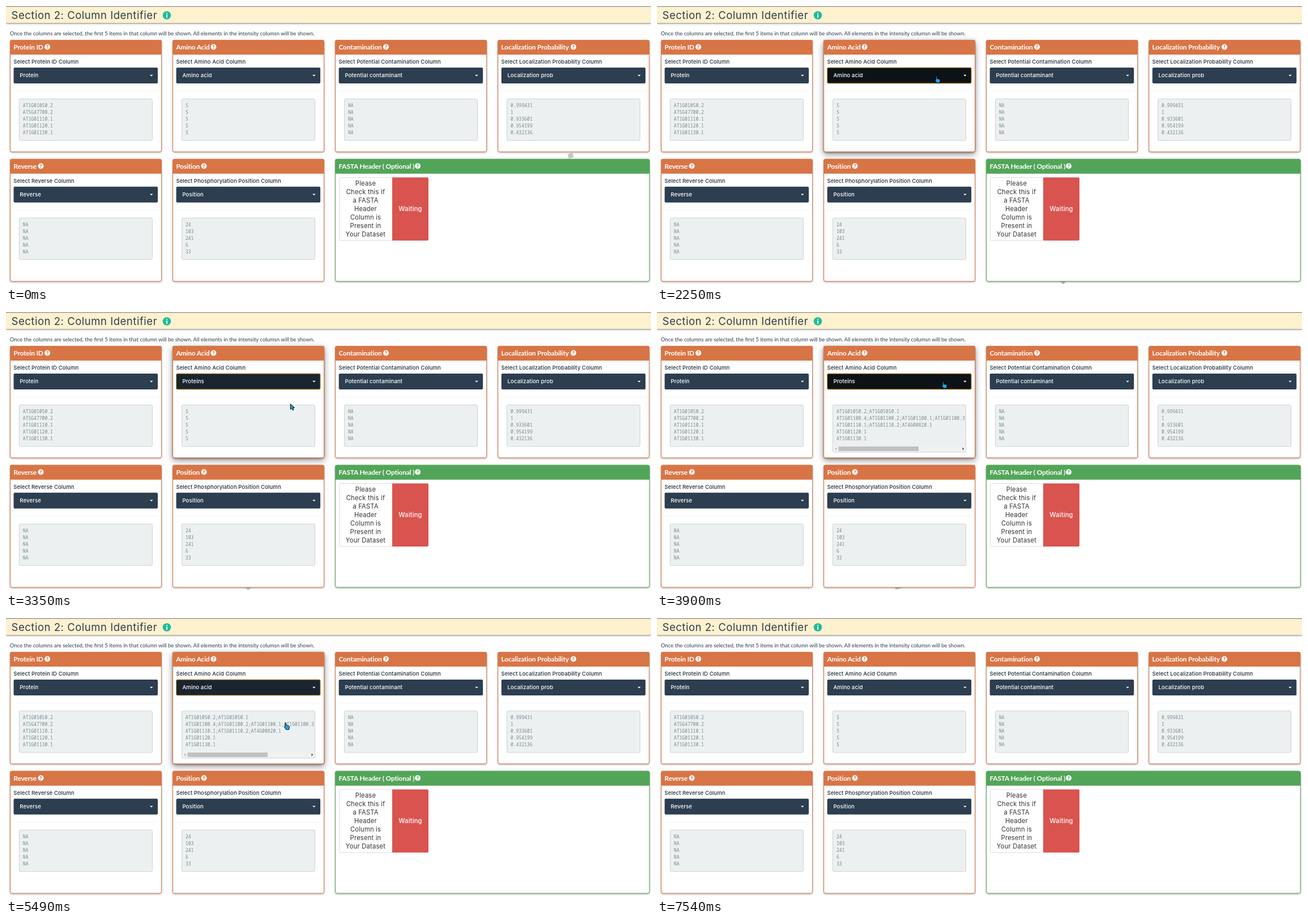
An HTML page that plays this animation: 1139 px wide and 492 px high, repeating every 7610 ms.

```html
<!DOCTYPE html>
<html lang="en">
<head>
<meta charset="utf-8">
<title>Column Identifier</title>
<style>
  html, body { margin: 0; width: 100%; height: 100%; overflow: hidden; background: #fefefe; }
  svg { display: block; }
  text { font: 500 9.6px Inter, sans-serif; letter-spacing: .1px; fill: #2c3e50; white-space: pre; }
  .title { font-size: 18.5px; font-weight: 400; letter-spacing: .53px; }
  .intro { font: 9.5px Lato, sans-serif; letter-spacing: 0; }
  .head { font: 700 12px Lato, sans-serif; letter-spacing: -.22px; fill: #fff; }
  .icon { font: 900 9px Lato, sans-serif; text-anchor: middle; }
  .label { font-size: 9.5px; fill: #1f2d3a; }
  .light { fill: #fff; }
  .mono { font: 8.05px "Noto Sans Mono", monospace; letter-spacing: 0; fill: #7b8a8b; }
  .toggle { font-size: 11.2px; font-weight: 400; letter-spacing: .2px; text-anchor: middle; fill: #333; }
  .item { fill: #8a9697; font-weight: 400; }
  .base { filter: drop-shadow(0 1px 1.5px rgba(0,0,0,.35)); }
  .lift { filter: drop-shadow(0 4px 6px rgba(0,0,0,.42)); opacity: 0; }
</style>
</head>
<body>
<svg id="stage" width="1139" height="492" viewBox="0 0 1139 492"></svg>
<script>
const LOOP = 7610, NAVY = '#2c3e50', ORANGE = '#d87546', GREEN = '#52a558';
const stage = document.getElementById('stage');
const $ = id => document.getElementById(id);

const rect = (x, y, w, h, fill, extra = '') =>
  `<rect x="${x}" y="${y}" width="${w}" height="${h}" fill="${fill}" ${extra}/>`;
const text = (x, y, cls, str, extra = '') => `<text x="${x}" y="${y}" class="${cls}" ${extra}>${str}</text>`;
const path = (d, fill, extra = '') => `<path d="${d}" fill="${fill}" ${extra}/>`;
const lines = (x, y, list) => list.map((s, i) => text(x, y + i * 12, 'mono', s)).join('');

function panel(id, x, y, w, h, color, title, iconX) {
  const box = cls => rect(x + .5, y + .5, w - 1, h - 1, '#fff', `rx="3" class="${cls}" stroke="${color}"`);
  return `<g id="${id}">` + box('base') + box('lift') +
    path(`M${x} ${y + 26}v-23q0-3 3-3h${w - 6}q3 0 3 3v23z`, color) +
    text(x + 6.3, y + 16.8, 'head', title) +
    `<circle cx="${iconX}" cy="${y + 12.5}" r="5" fill="#fff"/>` +
    text(iconX, y + 15.8, 'icon', '?', `style="fill:${color}"`);
}

function column(id, col, row, title, iconX, label, value, items) {
  const x = 7 + col * 287.1, y = 60 + row * 210.7;
  return panel(id, x, y, 268, row ? 217 : 198.5, ORANGE, title, iconX) +
    text(x + 6.3, y + 42.4, 'label', `Select ${label} Column`) +
    rect(x + 6.5, y + 49, 254.5, 28, NAVY, 'rx="2" class="button"') +
    text(x + 17.3, y + 66.4, 'light value', value) +
    path(`M${x + 247} ${y + 61.8}h5.6l-2.8 2.8z`, '#fff') +
    rect(x + 6.5, y + 90, 254.5, 1, '#f1f3f3') +
    rect(x + 16.3, y + 104.5, 235, 73.5, '#ecf0f1', 'rx="2" stroke="#ccd2d4" class="output"') +
    `<g class="items">${lines(x + 22.8, y + 119.4, items)}</g></g>`;
}

const na = Array(5).fill('NA');
const options = ['Amino acid', 'Proteins', 'Positions within proteins', 'Leading proteins', 'Protein',
  'Fasta headers', 'Localization prob', 'Score diff', 'PEP', 'Score'];
const proteins = ['AT1G01050.2;AT1G01050.1', 'AT1G01100.4;AT1G01100.2;AT1G01100.1;AT1G01100.3',
  'AT1G01110.1;AT1G01110.2;AT4G00820.1', 'AT1G01120.1', 'AT1G01130.1'];
const prompt = ['Please', 'Check this if', 'a FASTA', 'Header', 'Column is', 'Present in', 'Your Dataset'];

const menu = `<g id="menu">` +
  rect(301, 138, 253.5, 203.5, '#fff', 'rx="2" stroke="#ccc" stroke-width=".7" class="base"') +
  rect(306.8, 145, 242.6, 27.8, '#fff', `rx="3" stroke="${NAVY}" stroke-width="1.5"`) +
  rect(317, 153, 1, 11, '#333', 'id="caret"') +
  `<clipPath id="list"><path d="M301 175.5h253v164.5h-253z"/></clipPath><g clip-path="url(#list)">` +
  options.map((s, i) => {
    const y = 175.5 + i * 16.9;
    return `<g class="option">${rect(301, y, 244, 17, NAVY)}${text(314, y + 11.6, 'item', s)}</g>`;
  }).join('') + `</g>` +
  rect(545, 175.5, 9, 165, '#f1f1f1') + rect(545.7, 185, 7.4, 10, '#c1c1c1') +
  path('M547 182.3h5l-2.5-3z', '#a3a3a3') + path('M547 332.3h5l-2.5 3z', '#505050') + `</g>`;

const longOutput = `<g id="long">` +
  rect(310.4, 164.5, 235, 83.5, '#ecf0f1', 'rx="2" stroke="#ccd2d4"') +
  `<clipPath id="inner"><path d="M311 165h234v82h-234z"/></clipPath>` +
  `<g clip-path="url(#inner)">${lines(316.9, 179.4, proteins)}</g>` +
  rect(311, 237, 234, 10, '#f1f1f1') + rect(320.5, 238, 141.5, 8, '#c1c1c1') +
  path('M317 239.7v4.6l-2.4-2.3z', '#a3a3a3') + path('M539.5 239.5v5l2.8-2.5z', '#505050') + `</g>`;

stage.innerHTML =
  rect(0, 0, 1139, 492, '#fefefe') +
  rect(0, 1, 1139, 29.5, '#fef1cf', 'class="base"') + rect(0, 0, 1139, 1.5, '#a0a09c') +
  rect(0, 30, 1139, 1, '#a8a59b') +
  text(9.5, 22.8, 'title', 'Section 2: Column Identifier') +
  `<circle cx="284" cy="16.5" r="7.3" fill="#1fbb9c"/>` +
  text(284, 20.6, 'icon', 'i', 'style="fill:#fff;font-size:11.5px"') +
  text(6.8, 51.8, 'intro', 'Once the columns are selected, the first 5 items in that column will be shown. ' +
    'All elements in the intensity columsn will be shown.') +
  `<g id="cubes">${rect(-4.5, -4, 9, 8, '#c6c6c6') + rect(-5, -5, 10, 10, '#a9c0d2') + rect(-5, -5, 10, 10, '#c4cacd')}</g>` +
  column('protein', 0, 0, 'Protein ID', 73, 'Protein ID', 'Protein',
    ['AT1G01050.2', 'AT5G47700.2', 'AT1G01110.1', 'AT1G01120.1', 'AT1G01130.1']) +
  column('contamination', 2, 0, 'Contamination', 671, 'Potential Contamination', 'Potential contaminant', na) +
  column('localization', 3, 0, 'Localization Probability', 1002, 'Localization Probability', 'Localization prob',
    ['0.999431', '1', '0.933601', '0.954199', '0.432136']) +
  column('reverse', 0, 1, 'Reverse', 61.5, 'Reverse', 'Reverse', na) +
  column('position', 1, 1, 'Position', 349.5, 'Phosphorylation Position', 'Position', ['24', '103', '241', '6', '33']) +
  panel('fasta', 581.2, 270.7, 555.5, 217, GREEN, 'FASTA Header ( Optional )', 727) +
  rect(588.5, 303.5, 157, 111.5, '#fff', 'rx="2" stroke="#d9dcdd"') +
  path('M682 303.5h62q2 0 2 2v107.500q0 2-2 2h-62z', '#d9534f') +
  prompt.map((s, i) => text(635, 318.4 + i * 14.9, 'toggle', s)).join('') +
  text(714, 363.2, 'toggle', 'Waiting', 'style="fill:#fff;font-weight:500"') + `</g>` +
  column('amino', 1, 0, 'Amino Acid', 366.5, 'Amino Acid', 'Amino acid', Array(5).fill('S')) +
  longOutput + menu +
  `<g id="cursor" stroke="#000" stroke-width=".9" stroke-linejoin="round">` +
  path('M0 0v9.600l2.300-2 1.700 3.500 1.800-.8-1.600-3.500h3.100z', '#1c9be0') +
  path('M-1 1q1-1.700 2 0v3.500l4 .9q2 .5 1.600 2.600l-1 4h-5l-3.200-4.300q0-1.600 1.600-.6z', '#1ca4ea') + `</g>`;

const amino = cls => stage.querySelector('#amino .' + cls);
const button = amino('button'), value = amino('value');
const output = amino('output'), items = amino('items');
const optionNodes = [...stage.querySelectorAll('.option')];
const cubes = [...$('cubes').children];
const [arrow, hand] = $('cursor').children;

const show = (node, on) => node.setAttribute('visibility', on ? 'visible' : 'hidden');
const clamp = v => Math.max(0, Math.min(1, v));
const between = (t, a, b) => t >= a && t < b;
const fade = (t, a, b, time) => Math.min(clamp((t - a) / time), clamp((b - t) / time + 1));

// time, x, y of the pointer's hot spot
const route = [[600, 470, 505], [1250, 484, 255], [1900, 487, 203], [2170, 493.5, 124], [2320, 493.5, 124],
  [2740, 499.5, 197], [3080, 499.5, 197], [3650, 505.5, 123], [3970, 505.5, 123], [4400, 499, 176],
  [4500, 499, 176], [4670, 494, 185.5], [5540, 494, 185.5], [5700, 565, 282], [5960, 770, 505]];

function pointer(t) {
  const i = route.findIndex(k => k[0] > t);
  if (i < 1) return [0, -50];
  const a = route[i - 1], b = route[i];
  const p = (t - a[0]) / (b[0] - a[0]), e = p * p * (3 - 2 * p);
  return [a[1] + (b[1] - a[1]) * e, a[2] + (b[2] - a[2]) * e];
}

function placeCube(i, x, y, angle, opacity) {
  cubes[i].setAttribute('transform', `translate(${x} ${y}) rotate(${angle})`);
  cubes[i].setAttribute('opacity', opacity);
}

function draw(t) {
  const [x, y] = pointer(t);
  const opened = between(t, 2320, 3080) ? 2320 : between(t, 3970, 5290) ? 3970 : 0;
  const pressed = between(t, 2190, 2320) || between(t, 3830, 3970);
  const focused = between(t, 3080, 3830) || between(t, 5290, 7540);
  const overButton = !opened && between(y, 109, 137);
  const picked = between(t, 3080, 5290) ? 1 : 0;

  button.setAttribute('fill', pressed ? '#0d1217' : opened || focused || overButton ? '#1a242f' : NAVY);
  button.setAttribute('stroke', pressed || focused ? '#e0a32e' : 'none');
  value.textContent = options[picked];

  const long = between(t, 3480, 5760);
  show($('long'), long);
  show(output, !long);
  show(items, !long);

  show($('menu'), opened);
  show($('caret'), opened && (t - opened) % 1060 < 530);
  const hovered = opened && y > 177 ? Math.floor((y - 175.5) / 16.9) : -1;
  optionNodes.forEach((node, i) => {
    const on = opened && (i === picked || i === hovered);
    show(node.firstChild, on);
    node.lastChild.style.fill = on ? '#fff' : '';
    node.lastChild.style.fontWeight = on ? 500 : '';
  });

  const lift = { position: [620, 1200], amino: [1200, 5640], fasta: [5680, 5980] };
  for (const id in lift)
    stage.querySelector(`#${id} .lift`).style.opacity = fade(t, ...lift[id], 300);

  placeCube(0, 997 + t / 130, 265, t / 12 - 14, clamp((430 - t) / 200));
  placeCube(1, 717 - Math.max(0, t - 2250) / 200, 485.500 - Math.max(0, t - 2250) / 500, 40 + (t - 2250) / 15,
    fade(t, 1000, 2700, 300));
  placeCube(2, 431 - (t - 2800) / 180, 485.500, 20 + (t - 2800) / 20, fade(t, 2500, 4100, 300));

  const useHand = overButton || (opened && y > 177) || between(t, 5290, 5550);
  $('cursor').setAttribute('transform', `translate(${x} ${y})`);
  show(arrow, !useHand);
  show(hand, useHand);
}

const start = performance.now();
(function tick() {
  draw((performance.now() - start) % LOOP);
  requestAnimationFrame(tick);
})();
</script>
</body>
</html>
```
